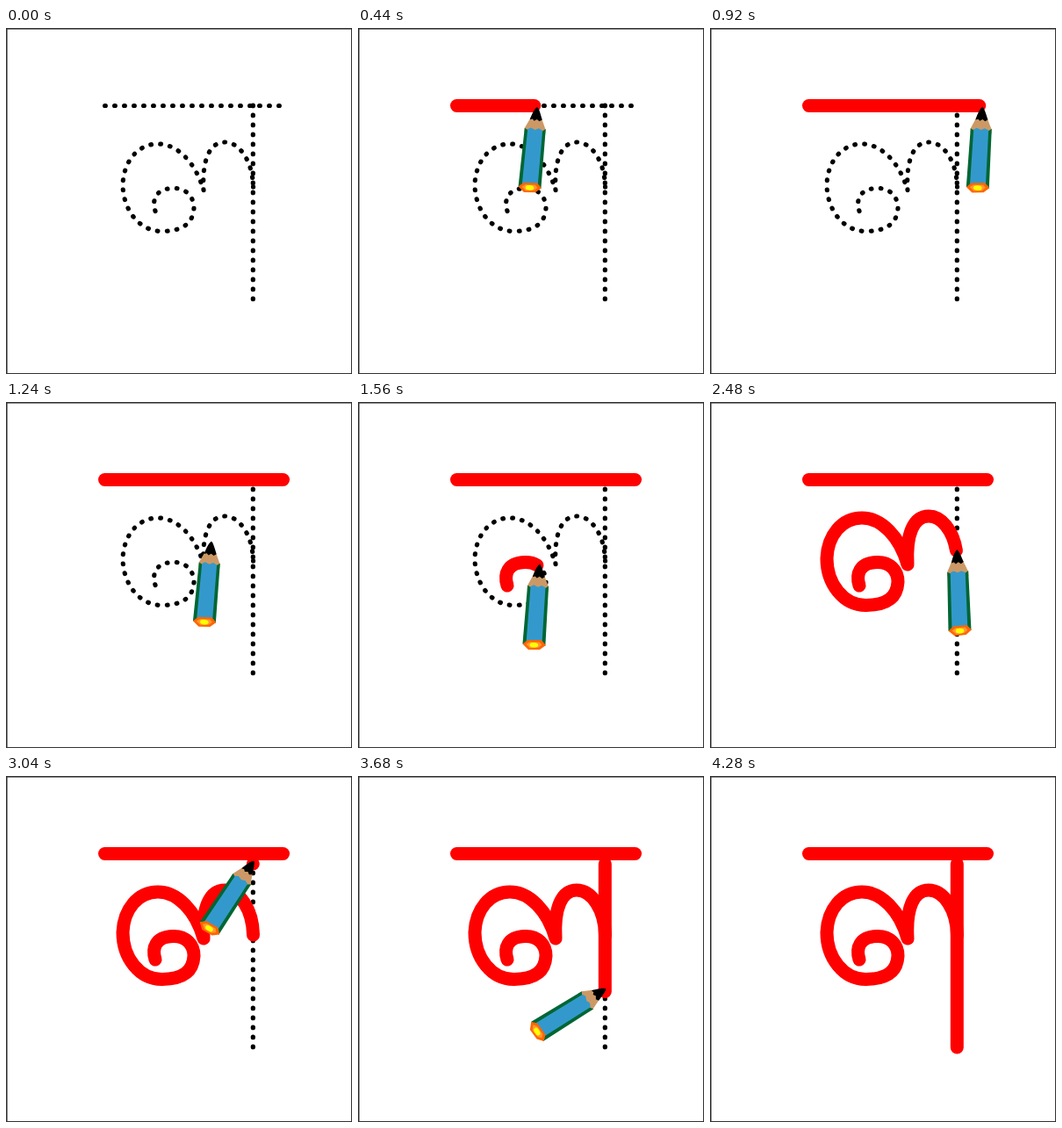
An HTML page that plays this animation: 394 by 394 pixels, repeating every 4.32 s.

```html
<!DOCTYPE html>
<html lang="en">
<head>
<meta charset="utf-8">
<title>Letter tracing</title>
<style>
  html, body { margin: 0; width: 100%; height: 100%; overflow: hidden; background: #fff; }
  svg { display: block; width: 100vw; height: 100vh; }
  .dots path { fill: none; stroke: #000; stroke-width: 5.2; stroke-linecap: round; stroke-dasharray: .7 10.3; }
  .ink path { fill: none; stroke: #f00; stroke-width: 15; stroke-linecap: round; stroke-linejoin: round; }
</style>
</head>
<body>
<svg viewBox="0 0 394 394">
  <rect width="394" height="394" fill="#333"/>
  <rect x="1.6" y="1.6" width="391.4" height="391.4" fill="#fff"/>
  <g class="dots"></g>
  <g class="ink"></g>
  <g id="pencil">
    <path fill="#c96" d="M-6 11 L6 11 L12 24 L12 29 L-12 29 L-12 24 Z"/>
    <path d="M0 -1 C2 0 4 5 7 13 L4 15 L1 13 L-2 15 L-4 13 L-7 14 C-5 6 -2 0 0 -1 Z"/>
    <path fill="#063" d="M-12 24 L-8 26 L8 26 L12 23 L13 91 L-13 91 Z"/>
    <path fill="#39c" d="M-8.5 25 L-5 23 L0 25 L4 23 L8.5 25 L9 91 L-9 91 Z"/>
    <path fill="#f60" d="M-13 91 L-7.5 86 L8 85 L13.5 90.5 L7 96 L-6 97 Z"/>
    <path fill="#f93" d="M-9 91 L-5 88 L6 87.5 L9 90.5 L5 94 L-4 95 Z"/>
    <ellipse cy="91.3" rx="4.8" ry="2.8" fill="#ff0"/>
  </g>
</svg>
<script>
  const STEP = 40, STEPS = 108;
  const CURVE = 'C166 196 170 183 190 182.5 C205 182 214 192 214 205 C213 222 202 231 178 231.5 ' +
    'C152 232 133 207 133 178 C134 152 150 132 173 132 C195 132 216 153 225 185 ' +
    'C223 150 232 130 249 130 C266 130 281 152 281.5 181';

  const guides = ['M112.6 88.5 H314', `M170 208.5 ${CURVE}`, 'M281.3 88 V310'];
  const strokes = [
    { d: 'M112.5 88.5 H315.5', from: 1, to: 24 },
    { d: `M170 209 ${CURVE}`, from: 36, to: 62.7 },
    { d: 'M281.3 100 V309', from: 76, to: 99 }
  ];
  // step, tilt in degrees, tip offset x, y
  const poses = [
    [1, 7, 3, 2.5], [23, 3.4, 3.5, 2.5], [36, 6, 3, 0], [39, 4, 3, 0],
    [47, 4, 1, 0], [56, -36, 1, -1], [60, -27, 1, 0], [62, -2, 1, 1],
    [63, -1, 0, 0], [76, 33.5, .5, -2.5], [99, 69, 0, -2.5]
  ];
  const FADE_FROM = 99, FADE_TO = 107;

  const pencil = document.getElementById('pencil');
  const clamp = v => Math.max(0, Math.min(1, v));
  const mix = (a, b, p) => a + (b - a) * p;

  function addPath(parent, d) {
    const path = document.createElementNS('http://www.w3.org/2000/svg', 'path');
    path.setAttribute('d', d);
    document.querySelector(parent).append(path);
    return path;
  }

  guides.forEach(d => addPath('.dots', d));
  for (const s of strokes) {
    s.path = addPath('.ink', s.d);
    s.length = s.path.getTotalLength();
    s.at = p => s.path.getPointAtLength(s.length * p);
  }

  function poseAt(n) {
    const i = poses.findIndex(k => k[0] > n);
    if (i === 0) return poses[0].slice(1);
    if (i < 0) return poses[poses.length - 1].slice(1);
    const a = poses[i - 1], b = poses[i];
    const p = (n - a[0]) / (b[0] - a[0]);
    return a.map((v, j) => mix(v, b[j], p)).slice(1);
  }

  // Follows the current stroke, or glides to the start of the next one.
  function penAt(n) {
    let i = strokes.length - 1;
    while (i > 0 && n < strokes[i].from) i--;
    const s = strokes[i], next = strokes[i + 1];
    const here = s.at(clamp((n - s.from) / (s.to - s.from)));
    if (!next || n <= s.to) return here;
    const start = next.at(0), p = (n - s.to) / (next.from - s.to);
    return { x: mix(here.x, start.x, p), y: mix(here.y, start.y, p) };
  }

  function draw(n) {
    for (const s of strokes) {
      const p = clamp((n - s.from) / (s.to - s.from));
      s.path.style.visibility = n < s.from ? 'hidden' : 'visible';
      s.path.style.strokeDasharray = p < 1 ? `${s.length * p} 2000` : 'none';
    }
    const { x, y } = penAt(n), [tilt, dx, dy] = poseAt(n);
    pencil.setAttribute('transform', `translate(${x + dx} ${y + dy}) rotate(${tilt})`);
    pencil.setAttribute('opacity', n < 1 ? 0 : 1 - clamp((n - FADE_FROM) / (FADE_TO - FADE_FROM)));
  }

  const begin = performance.now();
  function tick() {
    draw(Math.floor((performance.now() - begin) / STEP) % STEPS);
    requestAnimationFrame(tick);
  }
  tick();
</script>
</body>
</html>
```
